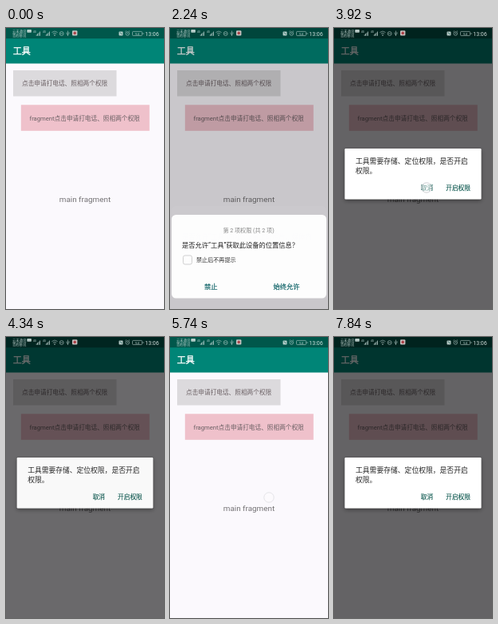
An HTML page that plays this animation: 198 by 352 pixels, repeating every 8000 ms.

```html
<!DOCTYPE html>
<html lang="zh-CN">
<head>
<meta charset="utf-8">
<title>权限申请</title>
<style>
  html, body { margin: 0; width: 100%; height: 100%; overflow: hidden; background: #fbf9fd; }
  svg { display: block; width: 100%; height: 100%; }
  text { font-family: Roboto, "Noto Sans CJK SC", "Noto Sans CJK", sans-serif; white-space: pre; }
  .title { font-size: 11px; fill: #fff; stroke: #fff; stroke-width: .3; }
  .label { font-size: 7.67px; fill: #6b6064; }
  .ask { font-size: 8.25px; fill: #1c1c1c; }
  .choice { font-size: 8.25px; fill: #0a6065; stroke: #0a6065; stroke-width: .22; }
  .message { font-size: 8.8px; fill: #242424; }
  .action { font-size: 7.7px; fill: #0b574e; stroke: #0b574e; stroke-width: .12; }
  .carrier { font-size: 4.3px; fill: #d5e4e1; }
  .line { fill: none; stroke: #d5e4e1; stroke-width: .6; }
  .solid { fill: #d5e4e1; }
  #dialog { transform-origin: 99px 183px; }
</style>
</head>
<body>
<svg viewBox="0 0 198 352" preserveAspectRatio="none">
  <defs>
    <filter id="shadow" x="-10%" y="-20%" width="120%" height="150%">
      <feDropShadow dx="0" dy="2" stdDeviation="2.5" flood-opacity=".4"/>
    </filter>
  </defs>

  <g id="app">
    <rect width="198" height="352" fill="#fbf9fd"/>
    <rect width="198" height="44.5" fill="#008577"/>
    <rect width="198" height="13.2" fill="#00574b"/>
    <text class="title" x="8.8" y="33.3">工具</text>
    <rect x="9" y="53" width="129.5" height="32.5" fill="#dcdadd"/>
    <text class="label" x="20" y="72.4">点击申请打电话、照相两个权限</text>
    <rect x="18.8" y="96.3" width="161" height="32.5" fill="#efc1cb"/>
    <text class="label" x="29.5" y="115.8">fragment点击申请打电话、照相两个权限</text>
    <text x="99" y="218" font-size="9.9" fill="#757376" text-anchor="middle">main fragment</text>
  </g>

  <rect id="scrim" width="198" height="352"/>

  <g id="status" opacity=".85">
    <text class="carrier" x="8" y="6">云禾通讯</text>
    <text class="carrier" x="8" y="11.4">青岭移讯</text>
    <rect class="solid" x="26.3" y="2" width="5.6" height="3.8" rx=".8"/>
    <g id="signals"></g>
    <path class="line" d="M57.5 5.5q3.5-3 7 0M58.8 7.3q2.2-2 4.4 0"/>
    <circle class="solid" cx="61" cy="9" r=".8"/>
    <circle class="line" cx="69.7" cy="7" r="2.5"/>
    <path class="line" d="M68 7h3.4M77.5 3.5v6.5M76 5.5v2l1.5 1.2 1.5-1.5v-2"/>
    <rect x="83" y="3.2" width="6.4" height="6.4" rx="1" fill="#e9dada"/>
    <circle cx="86.2" cy="6.4" r="1.8" fill="#c9444c"/>
    <rect class="solid" x="141.5" y="4.4" width="5" height="5" rx=".7"/>
    <path d="M143 5.5l2.3 2.6" stroke="#00574b" stroke-width=".8"/>
    <circle class="line" cx="152.3" cy="7" r="2.3"/>
    <path class="line" d="M152.3 5.7v1.5h1M149.5 4.6l1.2-1.1M155.1 4.6l-1.2-1.1"/>
    <rect class="line" x="158.5" y="4.4" width="12" height="5.2" rx="1"/>
    <path class="line" d="M172 6v2"/>
    <text x="164.5" y="8.6" font-size="4.4" class="solid" text-anchor="middle">54</text>
    <text x="174.3" y="9.7" font-size="7" fill="#f2f7f6">13:06</text>
  </g>

  <g id="sheet1"></g>
  <g id="sheet2"></g>

  <g id="dialog">
    <rect x="13.5" y="151" width="171" height="63.5" rx="1.2" fill="#fff" filter="url(#shadow)"/>
    <text class="message" x="27" y="170.2">工具需要存储、定位权限，是否开启</text>
    <text class="message" x="27" y="181.7">权限。</text>
    <text class="action" x="108.7" y="202.6">取消</text>
    <text class="action" x="140.2" y="202.6">开启权限</text>
  </g>

  <circle id="touch" r="6.2" fill="#fff" fill-opacity=".45" stroke="#b9bbc1" stroke-width=".7"/>
</svg>

<script>
const LOOP = 8000, STEP = 140, FADE = 3 * STEP;
const $ = id => document.getElementById(id);

const bars = x => [0, 1, 2, 3].map(i =>
  `<rect class="solid" x="${x + i * 1.4}" y="${8.4 - i * 1.3}" width=".8" height="${1.4 + i * 1.3}"/>`).join('');
$('signals').innerHTML = [34, 46].map(x =>
  `<text class="carrier" x="${x}" y="6" style="font-size:3.2px">4G</text>${bars(x + 3.8)}`).join('');

function drawSheet(el, page, lines) {
  const top = 245 - lines.length * 11;
  const text = lines.map((line, i) =>
    `<text class="ask" x="15" y="${top + 41 + i * 11}">${line}</text>`).join('');
  el.innerHTML = `
    <rect x="2" y="${top}" width="194" height="${338.5 - top}" rx="5.5" fill="#fff"/>
    <text x="98.5" y="${top + 21.5}" font-size="7.1" fill="#858585" text-anchor="middle">第 ${page} 项权限 (共 2 项)</text>
    ${text}
    <rect x="16.5" y="285" width="11" height="11" rx="2.2" fill="#fff" stroke="#c6c6c6" stroke-width=".8"/>
    <text x="33" y="293.4" font-size="7.1" fill="#2b2b2b">禁止后不再提示</text>
    <text class="choice" x="43" y="326.5">禁止</text>
    <text class="choice" x="129.5" y="326.5">始终允许</text>`;
}
drawSheet($('sheet1'), 1, ['是否允许“工具”访问您设备上的照片、媒体内', '容和文件？']);
drawSheet($('sheet2'), 2, ['是否允许“工具”获取此设备的位置信息？']);

// Every tap closes what is open; the next panel follows one step later.
const button = { x: 75, y: 70 }, deny = { x: 54, y: 330 }, cancel = { x: 116, y: 200 };
const ask = 560, next = 1820, denied = 2940;
const taps = [
  { at: ask, ...button }, { at: next, ...deny }, { at: denied, ...deny },
  ...[3920, 4480, 5600, 7140].map(at => ({ at, ...cancel }))
];

const clamp = v => Math.min(1, Math.max(0, v));
const easeOut = p => 1 - (1 - clamp(p)) ** 3;
const since = (t, start) => easeOut((t - start) / FADE);

function draw(t) {
  const tap = taps.findLast(({ at }) => at <= t);
  const sheet = since(t, ask);
  const swap = since(t, next + STEP);
  const asking = t <= denied;
  const justTapped = tap && t === tap.at;
  const dialog = t < denied + STEP ? 0 : justTapped ? 1 : since(t, tap.at + STEP);
  const sheetScrim = .2 * sheet * clamp(1 - (t - denied) / 200);

  $('scrim').style.opacity = Math.max(sheetScrim, .6 * dialog);
  $('sheet1').style.opacity = asking ? sheet * (1 - swap) : 0;
  $('sheet1').style.transform = `translate(0px, ${30 * (1 - sheet)}px)`;
  $('sheet2').style.opacity = asking ? swap : 0;
  $('dialog').style.opacity = dialog;
  $('dialog').style.transform = `scale(${.92 + .08 * dialog})`;

  const lift = tap ? clamp((t - tap.at) / (2 * STEP)) : 1;
  $('touch').style.opacity = 1 - lift;
  if (tap) $('touch').style.transform = `translate(${tap.x + 16 * lift}px, ${tap.y + 2 * lift}px)`;
}

function tick() {
  const t = performance.now() % LOOP;
  draw(Math.floor(t / STEP) * STEP);
  requestAnimationFrame(tick);
}
tick();
</script>
</body>
</html>
```
